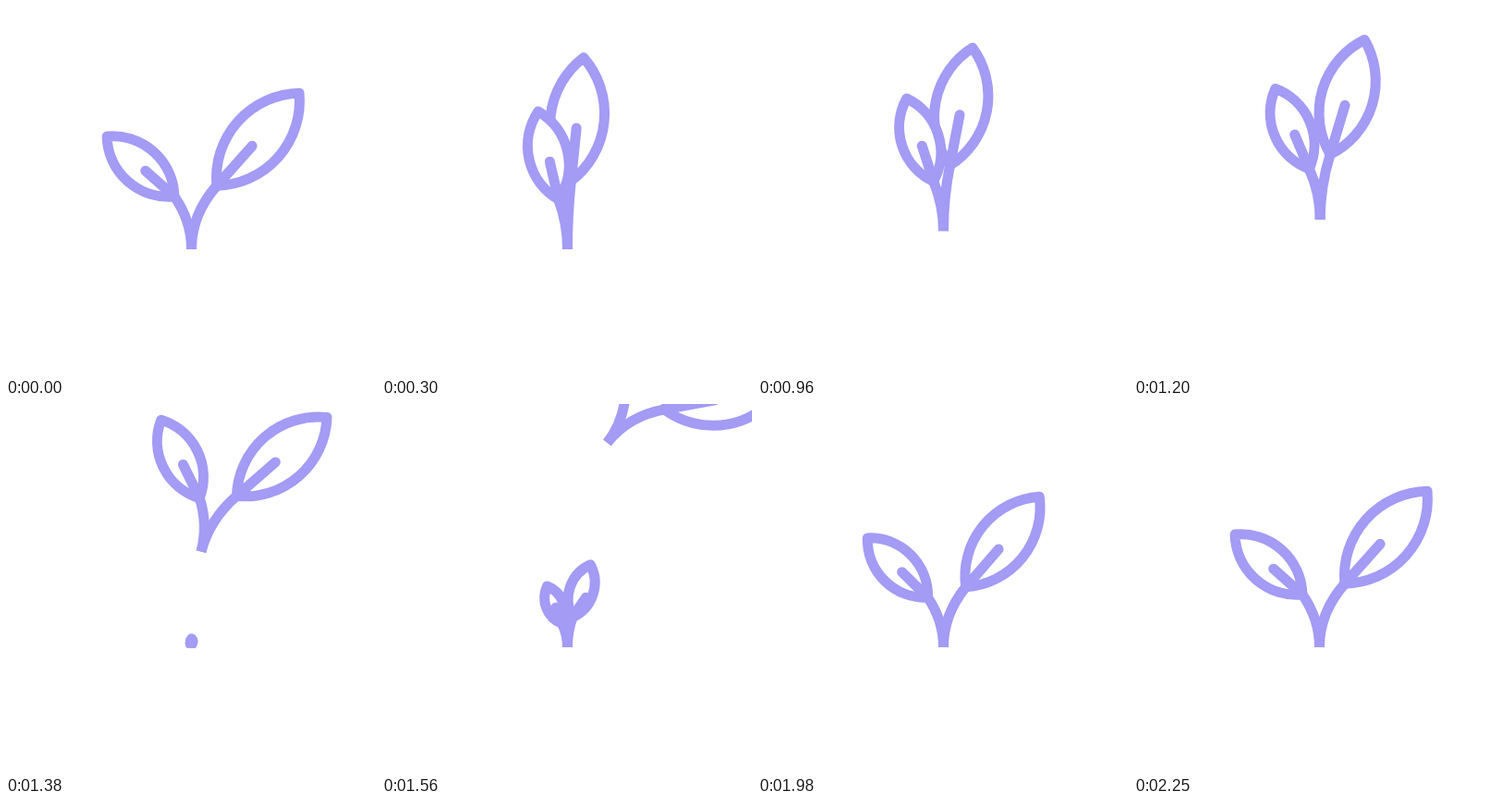
Write an HTML page that moves like this. It is 400x400 px and loops after 2730 ms.

```html
<!DOCTYPE html>
<html lang="en">
<head>
<meta charset="utf-8">
<title>Sprout</title>
<style>
  html, body { margin: 0; width: 100%; height: 100%; overflow: hidden; background: #fff; }
  svg { display: block; width: 100vw; height: 100vh; }
  path { fill: none; stroke: #a39bf4; stroke-width: 11; stroke-linejoin: round; }
  .leaf { fill: #fff; }
  .vein { stroke-linecap: round; }
</style>
</head>
<body>
<svg viewBox="0 0 400 400">
  <defs>
    <clipPath id="ground"><rect width="400" height="263.5"/></clipPath>
  </defs>
  <g id="old"></g>
  <circle id="seed" r="7.5" fill="#fff"/>
  <g clip-path="url(#ground)"><g id="young"></g></g>
</svg>
<script>
const LOOP = 2730, STEP = 30, GROUND = 263, MID = 200.5;
const CLOSE_END = 360, JUMP = 300, PEAK = 570, LEAVE = 1080;
const GROW = 1363, GROWN = 2250;
const $ = id => document.getElementById(id);
const clamp = x => Math.max(0, Math.min(1, x));
const mix = (a, b, u) => a + (b - a) * u;
const span = (t, a, b) => clamp((t - a) / (b - a));
const smooth = u => u * u * (3 - 2 * u);
const polar = (r, deg) => {
  const a = deg * Math.PI / 180;
  return [r * Math.sin(a), -r * Math.cos(a)];
};
const add = (a, b) => [a[0] + b[0], a[1] + b[1]];
const pt = p => p.map(v => v.toFixed(2)).join(' ');

// Right leaf first, so that the left one covers it
function makeSprout(group) {
  const names = ['leaf', 'stem', 'vein', 'leaf', 'stem', 'vein'];
  return names.map(name => {
    const path = document.createElementNS('http://www.w3.org/2000/svg', 'path');
    path.setAttribute('class', name);
    return group.appendChild(path);
  });
}

function drawSide(paths, scale, s) {
  const base = polar(s.stem * scale, s.lean);
  const len = s.length * scale;
  const tip = add(base, polar(len, s.dir));
  const end = add(base, polar(s.vein * scale, s.veinDir));
  const arc = `A${len * 0.684} ${len * 0.684} 0 0 1 `;
  const bend = [0, -s.stem * scale * 0.51];
  paths[0].setAttribute('d', `M${pt(base)}${arc}${pt(tip)}${arc}${pt(base)}Z`);
  paths[1].setAttribute('d', `M0 0Q${pt(bend)} ${pt(base)}`);
  paths[2].setAttribute('d', `M${pt(base)}L${pt(end)}`);
}

function drawSprout(group, paths, p) {
  group.setAttribute('transform', `translate(${p.x} ${p.y}) rotate(${p.turn})`);
  const o = p.open, right = 41.7 * o, left = -48.3 * p.left;
  drawSide(paths.slice(0, 3), p.scale, {
    stem: 74, lean: 21.7 * o, length: 134, dir: right,
    vein: 57.5, veinDir: right + p.twist
  });
  drawSide(paths.slice(3), p.scale, {
    stem: 60 - 8 * Math.pow(1 - o, 3), lean: -9 - 9 * o,
    length: 97.5, dir: left, vein: 41.8, veinDir: left
  });
}

// Fold, hop, sink a little, then fly away to the upper right
function oldPose(t) {
  const p = { x: MID, y: GROUND, turn: 0, twist: 0 };
  const up = smooth(span(t, JUMP, PEAK));
  p.scale = mix(1, 0.965, up);
  if (t < CLOSE_END) p.open = mix(1, 0.07, smooth(t / CLOSE_END));
  else if (t < PEAK) p.open = mix(0.07, 0.23, smooth(span(t, CLOSE_END, PEAK)));
  else p.open = mix(0.23, 0.265, Math.sqrt(span(t, PEAK, LEAVE)));
  p.y = mix(GROUND, 214, up) + 34 * smooth(span(t, PEAK, LEAVE));
  if (t > LEAVE) {
    const d = t - LEAVE;
    p.x += 10.5 * Math.pow(d / 300, 3);
    p.y -= 17 * Math.pow(d / 120, 1.8);
    p.turn = Math.min(38, 14.7 * Math.pow(d / 300, 4));
    p.open = Math.min(1, p.open + 0.125 * Math.pow(d / 120, 1.63));
  }
  p.left = mix(0.15, 1, p.open);
  return p;
}

function youngPose(t) {
  const s = 1 - Math.pow(1 - span(t, GROW, GROWN), 2.357);
  return { x: MID, y: GROUND, turn: 0, twist: 28 * (1 - s), open: s, left: s, scale: s };
}

const oldGroup = $('old'), youngGroup = $('young'), seed = $('seed');
const oldPaths = makeSprout(oldGroup), youngPaths = makeSprout(youngGroup);
const show = (el, on) => el.setAttribute('visibility', on ? 'visible' : 'hidden');

function draw(time) {
  const t = Math.floor((time % LOOP) / STEP) * STEP;
  const flying = t < 1620, growing = t > GROW;
  show(oldGroup, flying);
  show(youngGroup, growing);
  if (flying) drawSprout(oldGroup, oldPaths, oldPose(t));
  if (growing) drawSprout(youngGroup, youngPaths, youngPose(t));

  // A pale seed drops past the left leaf
  show(seed, t >= 660 && t < 780);
  seed.setAttribute('cx', 187);
  seed.setAttribute('cy', 167 + 4 * Math.pow((t - 660) / 30, 2));
}

let start;
function tick(now) {
  if (start === undefined) start = now;
  draw(now - start);
  requestAnimationFrame(tick);
}
draw(0);
requestAnimationFrame(tick);
</script>
</body>
</html>
```
